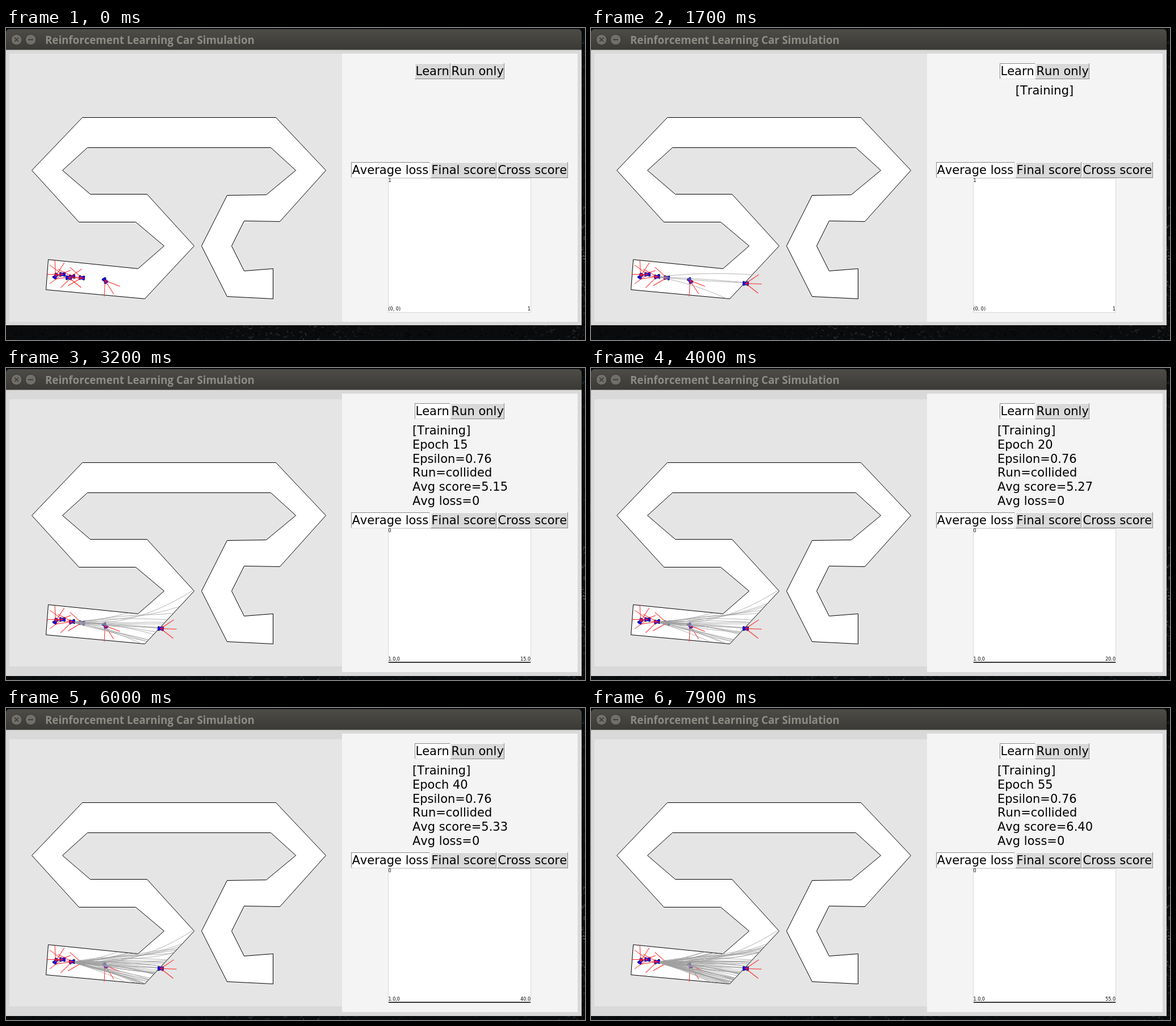
Write an HTML page with a canvas that moves like this. It is 1020 by 549 pixels and loops after 8000 ms.

```html
<!DOCTYPE html>
<html lang="en">
<head>
<meta charset="utf-8">
<title>Reinforcement Learning Car Simulation</title>
<style>
html, body { margin: 0; width: 100%; height: 100%; overflow: hidden; background: #080a0a; }
canvas { display: block; }
</style>
</head>
<body>
<canvas id="stage" width="1020" height="549"></canvas>
<script>
const W = 1020, H = 549, LOOP = 8000, LEARN_AT = 500, RESIZE_AT = 1800, RUNS_PER_MS = 0.009;
const ctx = document.getElementById('stage').getContext('2d');
const UI = '21px "DejaVu Sans", sans-serif';
const TINY = '8px "DejaVu Sans", sans-serif';
const rad = deg => deg * Math.PI / 180;
const clamp = (v, lo, hi) => Math.max(lo, Math.min(hi, v));
ctx.fontKerning = 'none';

function seeded(seed) {
  return () => {
    seed = (seed * 1664525 + 1013904223) % 4294967296;
    return seed / 4294967296;
  };
}

// Gates along the road: grid column, grid row, angle of the line from left to right edge.
const GATES = [
  [0, 7.52, 95], [5, 8, 78], [7, 6, 0], [5, 4, -68], [2, 4, -68], [0, 2, 0], [2, 0, 80],
  [12, 0, 100], [14, 2, 180], [12, 4, 243], [10, 4, 236], [9, 6, 180], [10, 8, 124], [12, 8, 90]
];

function makeTrack() {
  const edge = side => GATES.map(([col, row, angle]) => [
    72 + 33.2 * col + side * 26.6 * Math.cos(rad(angle)),
    183.5 + 33.25 * row + side * 26.6 * Math.sin(rad(angle))
  ]);
  const path = new Path2D();
  [...edge(-1), ...edge(1).reverse()].forEach(([x, y]) => path.lineTo(Math.round(x) + 0.5, Math.round(y) + 0.5));
  path.closePath();
  return path;
}
const track = makeTrack();

// x, y, heading in degrees
const PARKED = [[87, 436, -57], [99, 433, 180], [116, 437, 172], [133, 439, 186], [174, 444, 57]];

// Slope and bend of the opening runs; the later ones fan out evenly.
const OPENING = [[3.5, 1.9], [-11.2, 5.3], [9.6, -2], [16.8, 11.6], [7, 0], [2, 9], [12.2, -18]];

function makeTraces(count) {
  const rnd = seeded(77);
  return Array.from({ length: count }, (_, i) => {
    const aim = (i * 0.618 % 1) * 2 - 1;
    const bend = 9 * (rnd() * 2 - 1) + 6 * aim;
    const [slope, curve] = OPENING[i] || [8 + 22 * aim, bend];
    const sway = OPENING[i] ? 0 : rnd() * 3 - 1.5;
    const yAt = x => {
      const d = (x - 116) / 100;
      return 438 + slope * d + curve * d * d + sway * Math.sin(5 * d);
    };
    const path = new Path2D();
    for (let x = 121; ctx.isPointInPath(track, x, yAt(x)); x++) path.lineTo(x, yAt(x));
    return path;
  });
}
const traces = makeTraces(60);

const runsDone = t => Math.max(0, Math.floor(5 + (Math.floor(t / 100) * 100 - RESIZE_AT) * RUNS_PER_MS + 1e-6));

// epoch, average score
const SCORES = [[5, 5.57], [15, 5.15], [30, 5.5], [50, 5.17], [55, 6.4]];
function scoreAt(epoch) {
  const next = Math.max(1, SCORES.findIndex(([n]) => n >= epoch));
  const [n0, s0] = SCORES[next - 1], [n1, s1] = SCORES[next];
  return s0 + (s1 - s0) * (epoch - n0) / (n1 - n0);
}

function box(x0, y0, x1, y1, color) {
  ctx.fillStyle = color;
  ctx.fillRect(x0, y0, x1 - x0, y1 - y0);
}

function line(x0, y0, x1, y1, color, width = 1) {
  ctx.strokeStyle = color;
  ctx.lineWidth = width;
  ctx.beginPath();
  ctx.moveTo(x0, y0);
  ctx.lineTo(x1, y1);
  ctx.stroke();
}

function text(s, x, y, font = UI, color = '#000', align = 'left') {
  ctx.font = font;
  ctx.fillStyle = color;
  ctx.textAlign = align;
  ctx.fillText(s, x, y);
}

function makeLeather() {
  const c = document.createElement('canvas');
  c.width = W;
  c.height = H;
  const g = c.getContext('2d'), r = seeded(5);
  g.fillStyle = '#090b0c';
  g.fillRect(0, 0, W, H);
  for (let i = 0; i < 900; i++) {
    const onSide = i % 3 === 0;
    const x = onSide ? 1012 + r() * 8 : r() * W;
    const y = onSide ? r() * H : 522 + r() * 27;
    const glow = onSide
      ? 0.1 + 0.3 * Math.exp(-(((y - 400) / 110) ** 2))
      : 0.05 + 0.2 * Math.exp(-(((x - 500) / 130) ** 2)) + 0.2 * Math.exp(-(((x - 980) / 60) ** 2));
    g.strokeStyle = r() < 0.5 ? 'rgba(0,0,0,.5)' : `rgba(150,160,164,${glow})`;
    g.lineWidth = 1 + r();
    g.beginPath();
    g.moveTo(x, y);
    g.lineTo(x + r() * 10 - 4, y + r() * 8 - 4);
    g.stroke();
  }
  return c;
}
const leather = makeLeather();

function titleBar() {
  const shade = ctx.createLinearGradient(0, 2, 0, 38);
  shade.addColorStop(0, '#4e4c47');
  shade.addColorStop(1, '#3b3a36');
  ctx.fillStyle = shade;
  ctx.beginPath();
  ctx.roundRect(0, 2, 1014, 37, [6, 6, 0, 0]);
  ctx.fill();
  for (const x of [18.5, 43.5]) {
    ctx.beginPath();
    ctx.arc(x, 20.5, 9.5, 0, 7);
    ctx.fillStyle = '#716f69';
    ctx.fill();
    ctx.strokeStyle = '#33322e';
    ctx.lineWidth = 1;
    ctx.stroke();
  }
  line(15, 17, 22, 24, '#393834', 1.6);
  line(22, 17, 15, 24, '#393834', 1.6);
  line(39, 20.5, 48, 20.5, '#393834', 1.8);
  text('Reinforcement Learning Car Simulation', 69, 27.5, 'bold 18.7px "Open Sans", sans-serif', '#8e8c85');
}

function button(label, x0, x1, y, selected) {
  const y1 = y + 28;
  box(x0, y, x1, y1, selected ? '#fff' : '#d9d9d9');
  const [lit, dark] = selected ? ['#888', '#ddd'] : ['#fff', '#888'];
  line(x0, y + 0.5, x1, y + 0.5, lit);
  line(x0 + 0.5, y, x0 + 0.5, y1, lit);
  line(x0, y1 - 0.5, x1, y1 - 0.5, dark);
  line(x1 - 0.5, y, x1 - 0.5, y1, dark);
  text(label, x0 + 1.5, y + 21);
}

function car(x, y, heading) {
  ctx.save();
  ctx.translate(x + 0.5, y + 0.5);
  ctx.rotate(rad(heading));
  box(-5, -4, -2, 4, '#000');
  box(2, -4, 5, 4, '#000');
  box(-5.5, -3, 5.5, 3, '#1408d8');
  box(-1.5, -1.5, 2, 1.5, '#7c0878');
  for (const turn of [-36, 0, 36]) {
    line(0, 0, 28 * Math.cos(rad(turn)), 28 * Math.sin(rad(turn)), '#f22');
  }
  ctx.restore();
}

function drawTrack(t) {
  ctx.fillStyle = '#fff';
  ctx.fill(track);
  ctx.strokeStyle = '#000';
  ctx.lineWidth = 1;
  ctx.stroke(track);

  PARKED.forEach(c => car(...c));
  ctx.strokeStyle = '#a0a0a0';
  ctx.lineWidth = 0.8;
  traces.slice(0, runsDone(t)).forEach(p => ctx.stroke(p));

  const driven = clamp(Math.floor((t - LEARN_AT) / 100) + 1, 0, 9) / 9;
  car(110 + 162 * driven, 439 + 10 * driven, 2);
}

function drawPanel(t, epoch) {
  const training = t >= LEARN_AT;
  button('Learn', 720, 783, 62, training);
  button('Run only', 783, 878, 62, false);
  if (epoch) {
    const score = scoreAt(epoch).toFixed(2);
    ['[Training]', `Epoch ${epoch}`, 'Epsilon=0.76', 'Run=collided', `Avg score=${score}`, 'Avg loss=0']
      .forEach((s, i) => text(s, 716, 117 + Math.round(24.8 * i)));
  } else if (training) {
    text('[Training]', 799, 117, UI, '#000', 'center');
  }

  ctx.save();
  ctx.translate(0, epoch ? 18 : 0);
  button('Average loss', 608, 747, 236, true);
  button('Final score', 748, 864, 236, false);
  button('Cross score', 865, 990, 236, false);
  box(673, 264, 925, 501, '#d9d9d9');
  box(674, 265, 924, 500, '#fff');
  if (epoch) box(674, 499, 924, 500.5, '#000');
  text(epoch ? '0' : '1', 673.5, 271, TINY);
  text(epoch ? '1.0,0' : '(0, 0)', 673.5, 497, TINY);
  text(epoch ? epoch + '.0' : '1', 924, 497, TINY, '#000', 'right');
  ctx.restore();
}

function draw(t) {
  const grown = t >= RESIZE_AT;
  const epoch = grown ? Math.floor(runsDone(t) / 5) * 5 : 0;
  ctx.drawImage(leather, 0, 0);
  titleBar();
  box(0, 38.5, 1014, grown ? 542 : 523, '#d9d9d9');
  box(6, grown ? 55 : 45, 592, grown ? 525 : 517, '#e5e5e5');
  box(592, 45, 1007, grown ? 535 : 517, '#f4f4f4');
  ctx.save();
  ctx.translate(0, grown ? 9 : 0);
  drawTrack(t);
  ctx.restore();
  drawPanel(t, epoch);
}

const start = performance.now();
function frame() {
  draw((performance.now() - start) % LOOP);
  requestAnimationFrame(frame);
}
frame();
</script>
</body>
</html>
```
